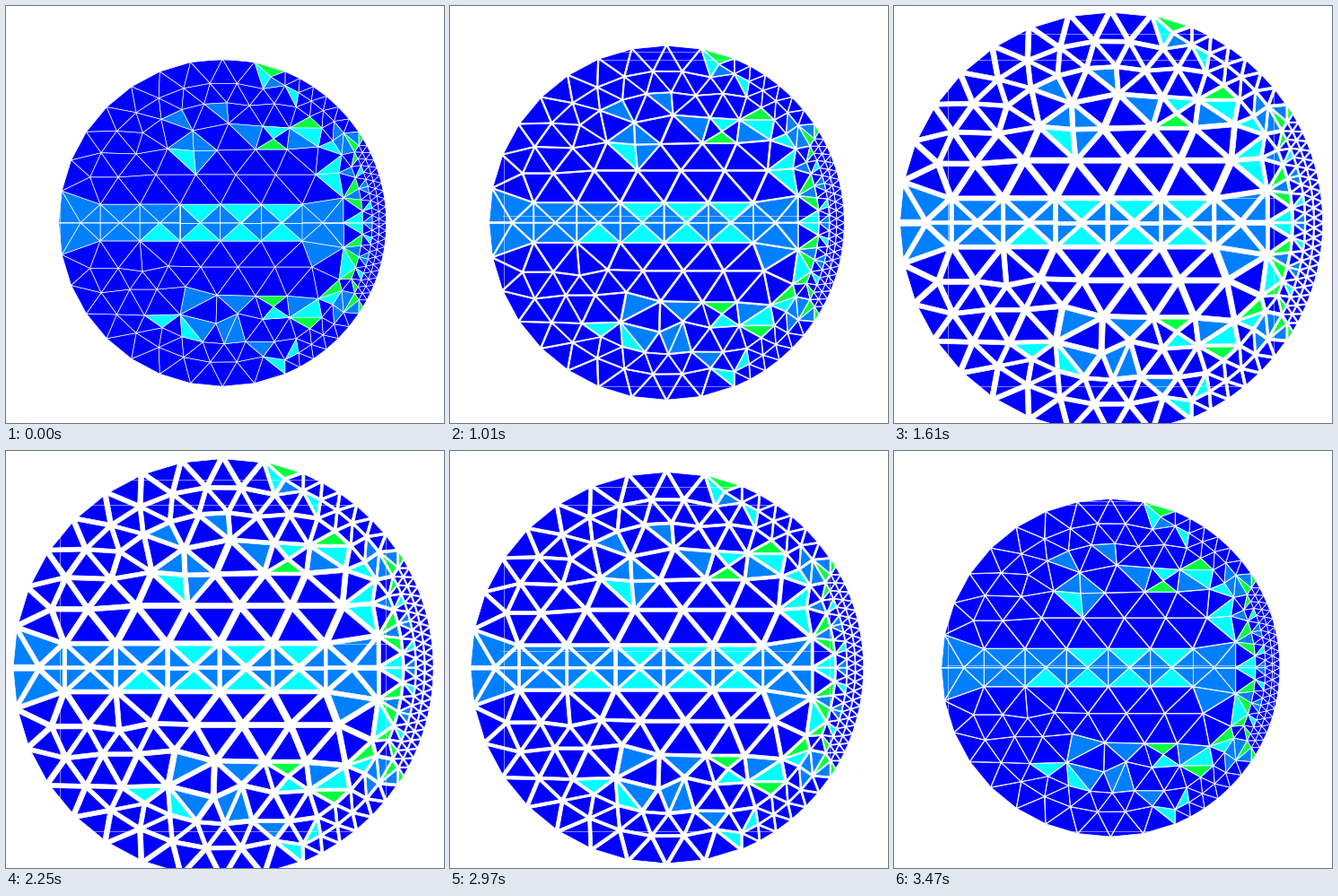
A matplotlib script for the animation above (3.83 s loop, 488 by 465 pixels).

```python
import numpy as np
import matplotlib.pyplot as plt
from matplotlib.animation import FuncAnimation
from matplotlib.collections import PolyCollection
from matplotlib.tri import Triangulation

W, H, DPI = 488, 465, 100
LOOP, TICK = 3830, 10
CX, CY = CENTER = np.array([241.2, 241.7])
RADIUS = 182.5

BLUE, LIGHT, CYAN, GREEN = "#0000ff", "#0080ff", "#00ffff", "#00ff40"

# Irregular interior vertices; the first group is mirrored about the axis.
MIRRORED = [(299, 109), (286, 134), (316, 136), (298, 148), (278, 160),
            (313, 160), (235, 161), (348, 157), (125, 191), (376, 214)]
UPPER = [(295, 79), (208, 139), (248, 131), (180, 159), (209, 161.5),
         (145, 165), (371, 186)]
LOWER = [(194, 344), (234, 354), (258, 343), (168, 316), (200, 313),
         (138, 316), (152, 296), (181, 290), (371, 305)]


def arc(radius, start, stop, count):
    a = np.radians(np.linspace(start, stop, count))
    return CENTER + radius * np.column_stack([np.cos(a), -np.sin(a)])


def row(y, xs):
    return np.column_stack([xs, np.full(len(xs), y)])


def with_mirror(points):
    points = np.asarray(points, dtype=float)
    return np.vstack([points, points * [1, -1] + [0, 2 * CY]])


def mesh_points():
    rim = [arc(RADIUS, 67.5, 292.5, 21),
           with_mirror(arc(RADIUS, 33.75, 61.875, 6)),
           arc(RADIUS, -30.9375, 30.9375, 23)]
    fine = [arc(174.5, -29.53, 29.53, 22),
            arc(167, -28.125, 28.125, 21),
            arc(156.5, -23.44, 23.44, 11),
            with_mirror(arc(168, 36.5, 65.5, 6)),
            with_mirror(arc(153, 29.7, 57.5, 5))]
    coarse = [with_mirror(arc(156, 73.1, 161, 9)),
              arc(134, 77, 131.5, 6),
              arc(135, -79, -130, 6),
              row(188, np.linspace(167, 345, 5)),
              row(291, np.linspace(217, 341, 4))]

    # Slightly widening cells, each with a vertex at its middle.
    i = np.arange(6)
    columns = 105 + 44 * i + 0.2 * i**2
    edges = np.append(columns, 376)
    middles = (edges[:-1] + edges[1:]) / 2
    band = [row(CY - 20.6, columns), row(CY + 20.4, columns),
            row(CY, np.concatenate([[83.2], edges, middles]))]
    return np.vstack(rim + fine + coarse + band
                     + [with_mirror(MIRRORED), UPPER, LOWER])


def quality(triangles):
    """1 for an equilateral triangle, falling to 0 for a flat one."""
    sides = np.roll(triangles, -1, axis=1) - triangles
    u, v = sides[:, 0], sides[:, 1]
    area = abs(u[:, 0] * v[:, 1] - u[:, 1] * v[:, 0]) / 2
    return 4 * np.sqrt(3) * area / (sides**2).sum(axis=(1, 2))


def disk_radius(ms):
    """Outer radius: stepped growth, a hold, then stepped shrinking."""
    if ms < 430:
        return RADIUS
    if ms < 860:
        return 185.2
    if ms < 2250:
        return 185.2 + 3.13 * min(16, (ms - 810) // 50)
    if ms < 2770:
        return 233.8
    return 233.8 - 3.02 * min(15, (ms - 2720) // 50)


points = mesh_points()
triangles = points[Triangulation(*points.T).triangles]
offsets = (triangles.mean(axis=1) - CENTER)[:, None, :]
levels = np.digitize(quality(triangles), [0.70, 0.828, 0.90])
colors = [(GREEN, CYAN, LIGHT, BLUE)[level] for level in levels]

fig = plt.figure(figsize=(W / DPI, H / DPI), dpi=DPI, facecolor="white")
ax = fig.add_axes([0, 0, 1, 1])
ax.set_xlim(0, W)
ax.set_ylim(H, 0)
ax.axis("off")

mesh = PolyCollection(triangles, facecolors=colors, edgecolors="white",
                      linewidths=0.7 * 72 / DPI)
ax.add_collection(mesh, autolim=False)

hairline = dict(color="white", alpha=0.5, lw=72 / DPI)
for x in (59.5, 422.5):
    ax.plot([x, x], [60, 423], **hairline)
for y in (60.5, 423.5):
    ax.plot([59, 423], [y, y], **hairline)
rising = {base: ax.plot([59, 423], [base, base], **hairline)[0]
          for base in (59, 241)}


def draw(frame):
    growth = disk_radius(frame * TICK) - RADIUS
    mesh.set_verts(triangles + offsets * growth / 176)
    for base, line in rising.items():
        y = round(base - 0.53 * growth) + 0.5
        line.set_ydata([y, y])
    return mesh, *rising.values()


anim = FuncAnimation(fig, draw, frames=LOOP // TICK, interval=TICK,
                     repeat=True, repeat_delay=0)
plt.show()
```
